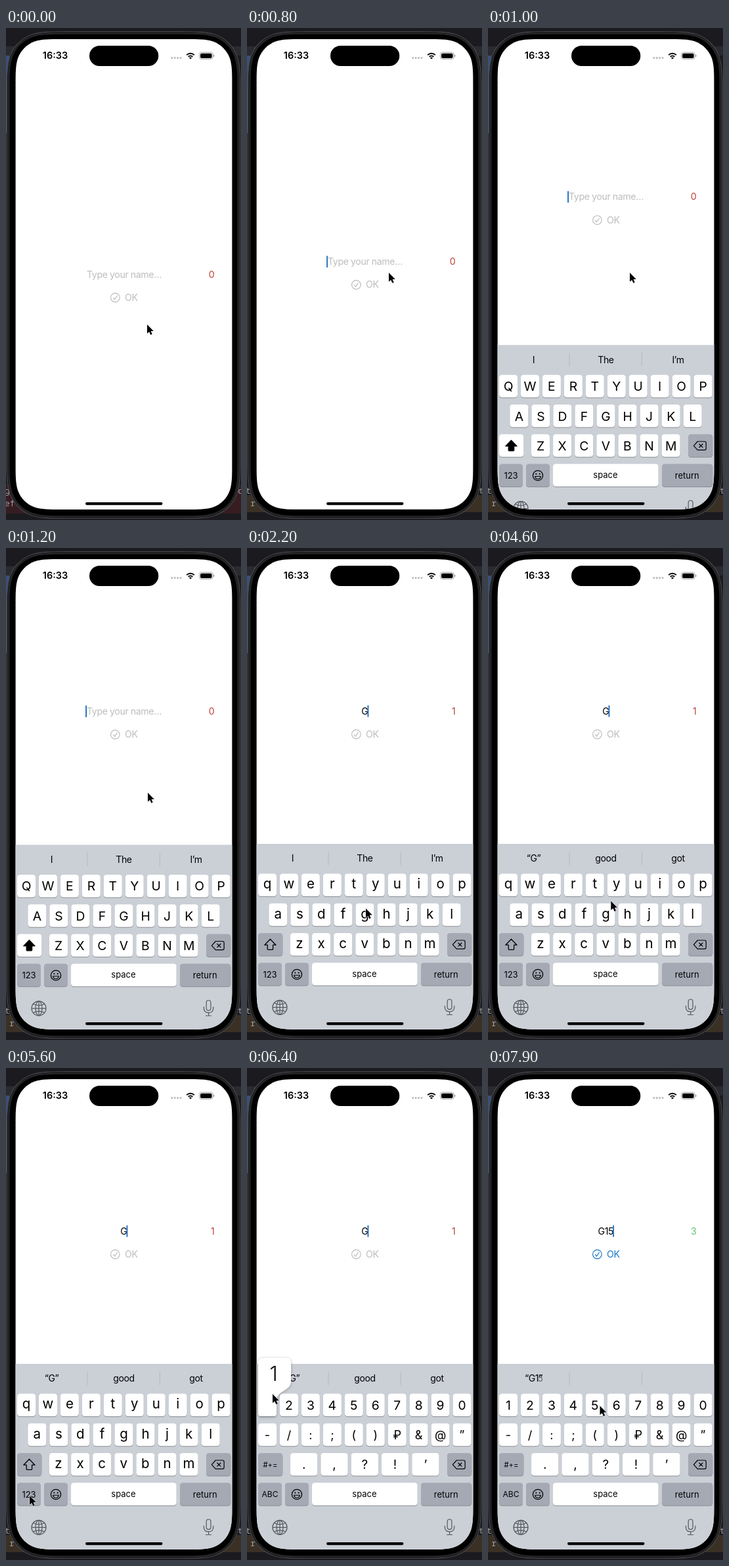
Animation, 358 px wide and 750 px high, one loop 8000 ms. Source, as an HTML page:

```html
<!DOCTYPE html>
<html lang="en">
<head>
<meta charset="utf-8">
<title>Name field</title>
<style>
html, body { margin: 0; width: 100%; height: 100%; overflow: hidden; background: #1b1b1f; }
svg { display: block; width: 358px; height: 750px; }
text { font-family: Inter, "Noto Sans", sans-serif; }
.mid { text-anchor: middle; }
.body { font-size: 14.2px; letter-spacing: -.03em; }
.code { font: 13px "Noto Sans Mono", monospace; fill: #a3a1a1; }
.line { fill: none; stroke-linecap: round; stroke-linejoin: round; }
.pop { filter: drop-shadow(0 1px 2px rgba(0, 0, 0, .28)); }
</style>
</head>
<body>
<svg id="stage" viewBox="0 0 358 750"></svg>
<script>
const LOOP = 8000;
const BG = '#cbcfd6', GRAY = '#a4a9b4', MUTED = '#bdbdbf';
const RED = '#bd433b', GREEN = '#5cc575', BLUE = '#1b78c8';
const ROWS = [496.5, 541.8, 587, 632.2], KEY_H = 34.5;

const clamp = v => Math.max(0, Math.min(1, v));
const smooth = v => (v = clamp(v)) * v * (3 - 2 * v);
// Critically damped spring used for the keyboard
const spring = ms => {
  const x = Math.max(0, ms) * .01826;
  return 1 - (1 + x) * Math.exp(-x);
};

const box = (x, y, w, h, r, fill, more = '') =>
  `<rect x="${x}" y="${y}" width="${w}" height="${h}" rx="${r}" fill="${fill}" ${more}/>`;
const label = (s, x, y, size, more = '') =>
  `<text class="mid" x="${x}" y="${y}" font-size="${size}" ${more}>${s}</text>`;
const line = (d, width, color = '#000', more = '') =>
  `<path class="line" d="${d}" stroke="${color}" stroke-width="${width}" ${more}/>`;
const esc = s => s.replace('&', '&amp;');

// Rounded rectangle with continuous-curvature corners
function squircle(x, y, w, h, r, more = '') {
  const half = [[1.528, 0], [1.088, 0], [.868, 0], [.631, .075], [.372, .169]];
  const corner = [...half, ...half.map(([a, b]) => [b, a]).reverse()];
  const at = (right, bottom, pts) => pts.map(([a, b]) =>
    `${right ? x + w - a * r : x + a * r} ${bottom ? y + h - b * r : y + b * r}`);
  const back = [...corner].reverse();
  const d = [at(0, 0, back), at(1, 0, corner), at(1, 1, back), at(0, 1, corner)]
    .map((p, i) => `${i ? 'L' : 'M'}${p[0]}C${p.slice(1).join(' ')}`).join('');
  return `<path d="${d}Z" ${more}/>`;
}

const key = (x, row, w, fill = '#fff') =>
  box(x, ROWS[row] + 1, w, KEY_H, 4.2, '#8b8d93') + box(x, ROWS[row], w, KEY_H, 4.2, fill);

const keyRow = (chars, row, first, pitch, w, size, dy) => [...chars].map((c, i) => {
  const cx = first + i * pitch;
  return key(cx - w / 2, row, w) + label(esc(c), cx, ROWS[row] + 17.5 + dy, size);
}).join('');

function letters(upper) {
  const set = s => upper ? s.toUpperCase() : s;
  const size = upper ? 19.3 : 20.5, dy = upper ? 7 : 5.2;
  const arrow = 'M35.4 596.3L44 605.2H39.6V611.3Q39.6 612.3 38.6 612.3H32.2Q31.2 612.3 31.2 611.3V605.2H26.8Z';
  return keyRow(set('qwertyuiop'), 0, 31, 32.95, 28, size, dy)
    + keyRow(set('asdfghjkl'), 1, 47.3, 33.05, 28, size, dy)
    + keyRow(set('zxcvbnm'), 2, 80, 33.1, 28, size, dy)
    + key(17, 2, 37.3, upper ? '#fff' : GRAY)
    + line(arrow, 1.3, '#000', upper ? 'style="fill:#000"' : '')
    + label('123', 35, 654.6, 13);
}

function symbols() {
  return keyRow('1234567890', 0, 31, 32.95, 28, 19.3, 7)
    + keyRow('-/:;()₽&@”', 1, 31, 32.95, 28, 18, 6.4)
    + keyRow('.,?!’', 2, 86.7, 46.3, 41.3, 19, 6.6)
    + key(17, 2, 37.3, GRAY)
    + label('#+=', 35.4, 609, 11.2)
    + label('ABC', 35, 654.4, 12);
}

function balloon(id, ch, cx, row, left, right) {
  const t = ROWS[row] - 54.5, a = cx - 14, b = cx + 14;
  return `<g id="${id}"><path class="pop" fill="#fff" d="M${left} ${t + 7}q0-7 7-7H${right - 7}q7 0 7 7V${t + 35}`
    + `C${right} ${t + 52} ${b} ${t + 48} ${b} ${t + 66}V${t + 85}q0 4-4 4H${a + 4}q-4 0-4-4V${t + 66}`
    + `C${a} ${t + 48} ${left} ${t + 52} ${left} ${t + 35}Z"/>`
    + label(ch, (left + right) / 2 - 1.5, t + 34.5, 31, 'font-weight="300"') + '</g>';
}

const HINTS = [
  { at: -999, words: ['I', 'The', 'I’m'] },
  { at: 2350, words: ['“G”', 'good', 'got'] },
  { at: 6650, words: ['“G1”'] }
];
const hints = HINTS.map((h, i) => `<g id="hint${i}">`
  + h.words.map((w, k) => label(w, 69.5 + 110 * k, 478.3, 14, 'letter-spacing="-.4"')).join('') + '</g>').join('');

const keyboard = `<g id="kb">${box(14, 451, 331, 300, 0, BG)}${hints}${label('5', 80, 478.3, 12.5, 'id="digit"')}
  ${line('M124 463.5V483M234.3 463.5V483', .9, '#b3b6be')}
  ${key(17, 3, 36, GRAY)}${key(58, 3, 36, GRAY)}${key(99, 3, 160.7)}${key(265, 3, 77.3, GRAY)}${key(305, 2, 37.3, GRAY)}
  ${label('space', 179, 654, 13)}${label('return', 303.3, 654.6, 13)}
  <circle cx="76" cy="650" r="7.6" fill="none" stroke="#000" stroke-width="1.3"/>
  <circle cx="73.3" cy="647.6" r="1.1"/><circle cx="78.7" cy="647.6" r="1.1"/>
  ${line('M71.6 651.2H80.4Q79.8 655.3 76 655.3T71.6 651.2Z', 1.1)}
  ${line('M319.3 598H329.8Q332.2 598 332.2 600.4V608.8Q332.2 611.2 329.8 611.2H319.3L313.4 604.6ZM321.8 602L327 607.2M327 602L321.8 607.2', 1.2)}
  <g id="upper">${letters(true)}</g><g id="lower">${letters(false)}</g><g id="symbols">${symbols()}</g>
  <g fill="none" stroke="#55585e" stroke-width="1.2">
    <circle cx="50" cy="700.3" r="11"/><ellipse cx="50" cy="700.3" rx="5" ry="11"/>
    <path d="M50 689.3V711.3M39 700.3H61M41.6 693.5Q50 698.3 58.4 693.5M41.6 707.1Q50 702.3 58.4 707.1"/>
    <rect x="305.2" y="688" width="6.8" height="15.4" rx="3.4"/>
    <path d="M301.4 698V700Q301.4 706.8 308.6 706.8T315.8 700V698M308.6 706.8V711.5M304.5 711.5H312.7" stroke-linecap="round"/>
  </g>
  ${balloon('popG', 'G', 179.5, 1, 154.5, 204.5)}${balloon('pop1', '1', 31, 0, 17, 67)}${balloon('pop5', '5', 162.8, 0, 137.8, 187.8)}
</g>`;

const desktop = `${box(0, 0, 358, 750, 0, '#1b1b1f')}${box(0, 28, 358, 14, 0, '#2a2b30')}${box(0, 42, 5, 118, 0, '#38507c')}
  <g id="deskA">${box(0, 696, 358, 44, 0, '#371d22')}
    <text class="code" x="-2" y="710">g</text><text class="code" x="-2" y="729">ef.</text><text class="code" x="353" y="710">c</text></g>
  <g id="deskB">${box(0, 712, 358, 26, 0, '#3a3024')}
    <text class="code" x="-2" y="710">t</text><text class="code" x="5" y="729">r</text><text class="code" x="353" y="710">t</text></g>`;

const statusBar = `<text x="55.8" y="47.4" font-size="14.5" font-weight="600">16:33</text>
  ${box(127, 27, 105.3, 31, 15.5, '#000')}
  ${[252.8, 257.2, 261.6, 266].map(x => `<circle cx="${x}" cy="45.6" r="1.5" fill="#b9b9b9"/>`).join('')}
  ${line('M275.2 41.1a8.4 8.4 0 0 1 11.6 0M277.7 43.8a4.8 4.8 0 0 1 6.6 0', 2, '#000', 'style="stroke-linecap:butt"')}
  <path d="M281 47.6l-2-2.1a3 3 0 0 1 4 0z"/>
  ${box(294.5, 37.2, 20.6, 10.2, 3.2, 'none', 'stroke="#a2a2a2"')}${box(296, 38.7, 17.6, 7.2, 2, '#000')}${box(316.1, 40.6, 1.3, 3.6, .6, '#a2a2a2')}`;

document.getElementById('stage').innerHTML = `
  <defs><clipPath id="screen">${squircle(14.6, 17, 329.8, 717, 46)}</clipPath></defs>
  ${desktop}
  ${squircle(1.5, 5.5, 355, 742, 60, 'stroke="#4c4d50" stroke-width="1.2"')}
  ${squircle(4, 8, 350, 737, 57.5, 'stroke="#252527" stroke-width="3"')}
  <g clip-path="url(#screen)">
    ${box(14, 16, 331, 719, 0, '#fff')}
    ${statusBar}
    <g id="form">
      <text id="hold" class="body" x="123" y="380.5" fill="${MUTED}">Type your name…</text>
      <text id="name" class="body mid" x="179.3" y="380.5"></text>
      <text id="count" class="body" x="317.3" y="380.5" text-anchor="end"></text>
      ${box(0, 366.7, 1.9, 18, .9, '#2371c2', 'id="caret"')}
      <g id="ok">
        <circle cx="166.4" cy="411" r="6.8" fill="none" stroke="currentColor" stroke-width="1.2"/>
        ${line('M163.4 411.4L165.6 414L169.4 408.2', 1.2, 'currentColor')}
        <text class="body" x="181" y="416" fill="currentColor">OK</text>
      </g>
    </g>
    ${keyboard}
    ${box(121, 723, 117.5, 4.2, 2.1, '#000')}
  </g>
  <path id="mouse" d="M0 0V13.8L3.2 10.9L5.3 15.8L7.7 14.8L5.6 10H9.8Z" stroke="#fff" stroke-width="1" paint-order="stroke" stroke-linejoin="round"/>`;

const el = {};
document.querySelectorAll('[id]').forEach(n => el[n.id] = n);
const show = (n, on) => n.setAttribute('visibility', on ? 'visible' : 'hidden');

// Pointer stops: arrive time, leave time, x, y
const STOPS = [
  [0, 80, 215, 452], [420, 1230, 216, 373], [1980, 2280, 181, 549.5], [2950, 3450, 188, 511],
  [4250, 4350, 191, 532], [4580, 4680, 187.3, 538.3], [5550, 5800, 36, 652],
  [6270, 6580, 39, 497], [7430, LOOP, 170.5, 515]
];

function pointer(t) {
  let i = STOPS.length - 1;
  while (i && t < STOPS[i][0]) i--;
  const [, leave, x, y] = STOPS[i], next = STOPS[i + 1];
  if (!next) return [x, y];
  const k = smooth((t - leave) / (next[0] - leave));
  return [x + (next[2] - x) * k, y + (next[3] - y) * k];
}

const FOCUS = 690;
const TYPED = [[2160, 'G'], [6470, 'G1'], [7650, 'G15']];

function caretAlpha(ms) {
  const p = ms % 1000;
  return p < 900 ? 1 - smooth((p - 520) / 160) : smooth((p - 880) / 120);
}

function draw(t) {
  const focused = t >= FOCUS;
  let name = '', since = FOCUS;
  for (const [at, s] of TYPED) if (t >= at) [since, name] = [at, s];

  el.form.setAttribute('transform', `translate(0 ${-127 * spring(t - 763)})`);
  el.kb.setAttribute('transform', `translate(0 ${283 * (1 - spring(t - 797))})`);
  show(el.kb, t >= 797);

  show(el.hold, !name);
  el.name.textContent = name;
  el.count.textContent = name.length;
  const valid = name.length >= 3;
  el.count.setAttribute('fill', valid ? GREEN : RED);
  el.ok.setAttribute('color', valid ? BLUE : MUTED);

  const end = name ? 179.3 + el.name.getComputedTextLength() / 2 : 122;
  el.caret.setAttribute('x', end - .9);
  el.caret.setAttribute('opacity', focused ? caretAlpha(t - since) : 0);

  const mode = t >= 5740 ? 'symbols' : name ? 'lower' : 'upper';
  for (const m of ['upper', 'lower', 'symbols']) el[m].style.display = m === mode ? '' : 'none';

  HINTS.forEach((h, i) => {
    const next = HINTS[i + 1];
    const inn = clamp((t - h.at) / 200), out = next ? clamp((t - next.at) / 200) : 0;
    el['hint' + i].setAttribute('opacity', inn * (1 - out));
  });
  el.digit.setAttribute('opacity', clamp((t - 7790) / 200));

  for (const [id, from, to] of [['popG', 1990, 2160], ['pop1', 6290, 6470], ['pop5', 7480, 7650]])
    el[id].style.display = t >= from && t < to ? '' : 'none';

  show(el.deskA, !focused);
  show(el.deskB, focused);
  el.mouse.setAttribute('transform', `translate(${pointer(t)})`);
}

const start = performance.now();
function tick() {
  draw((performance.now() - start) % LOOP);
  requestAnimationFrame(tick);
}
tick();
</script>
</body>
</html>
```
